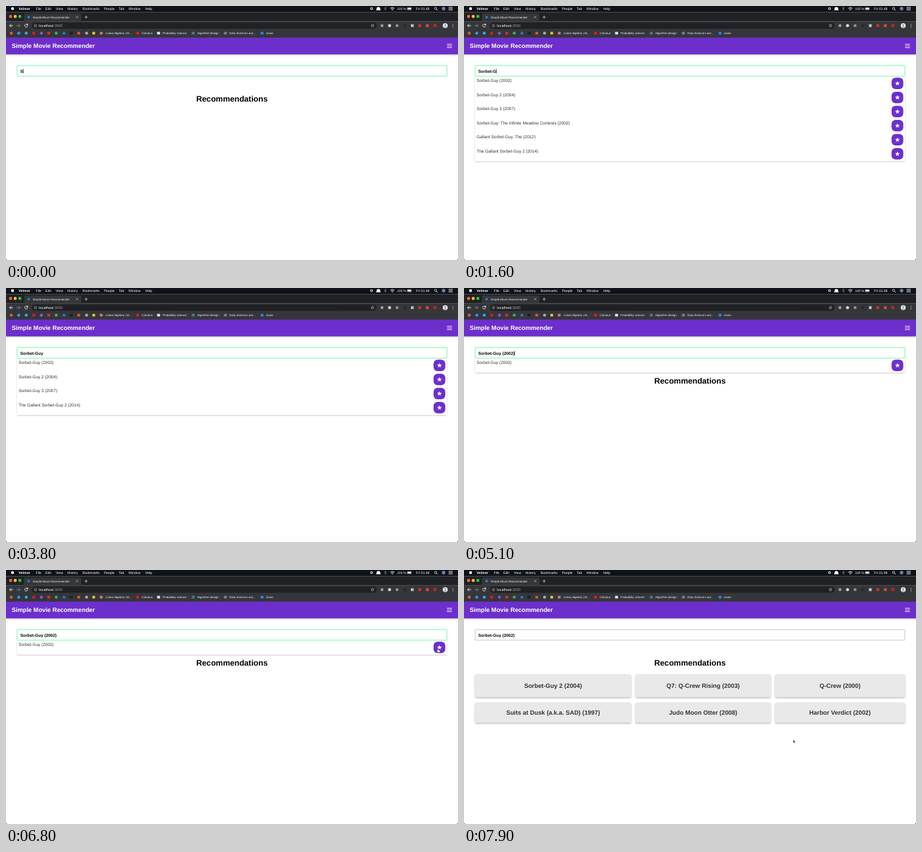
These frames come from a looping animation (690x388 px, 8000 ms). An HTML page:

```html
<!DOCTYPE html>
<html lang="en">
<head>
<meta charset="utf-8">
<title>Simple Movie Recommender</title>
<style>
html, body { margin: 0; width: 100%; height: 100%; overflow: hidden; background: #fff; }
svg { display: block; width: 690px; height: 388px; }
text { font-family: "Liberation Sans", Arial, sans-serif; white-space: pre; text-rendering: geometricPrecision; }
.b { font-weight: 700; }
.mid { text-anchor: middle; }
</style>
</head>
<body>
<svg id="stage" viewBox="0 0 690 388">
  <defs>
    <filter id="soft" x="-10%" y="-30%" width="120%" height="170%"><feGaussianBlur stdDeviation="1.6"/></filter>
    <filter id="thin" x="-5%" y="-30%" width="110%" height="160%"><feGaussianBlur stdDeviation="0.8"/></filter>
  </defs>
  <rect width="690" height="388" fill="#fff"/>
  <g id="page"></g>
  <g id="results"></g>
  <g id="list"></g>
  <g id="field"></g>
  <g id="frame"></g>
  <g id="pointer"></g>
</svg>
<script>
const LOOP = 8000, TICK = 100;
const PURPLE = '#6d2fcc';
const ROW = 21.52, TOP = 108;
const $ = id => document.getElementById(id);

const rect = (x, y, w, h, fill, r = 0, more = '') =>
  `<rect x="${x}" y="${y}" width="${w}" height="${h}" rx="${r}" fill="${fill}" ${more}/>`;
const dot = (x, y, r, fill, more = '') => `<circle cx="${x}" cy="${y}" r="${r}" fill="${fill}" ${more}/>`;
const line = (d, color = '#fff', w = 0.8) =>
  `<path d="${d}" fill="none" stroke="${color}" stroke-width="${w}" stroke-linecap="round" stroke-linejoin="round"/>`;
const label = (x, y, size, str, fill = '#000', cls = '') =>
  `<text x="${x}" y="${y}" font-size="${size}" fill="${fill}" class="${cls}">${str}</text>`;

function starPath(cx, cy, r) {
  const pts = [];
  for (let i = 0; i < 10; i++) {
    const a = i * Math.PI / 5 - Math.PI / 2, k = i % 2 ? r * 0.42 : r;
    pts.push((cx + k * Math.cos(a)).toFixed(2) + ' ' + (cy + k * Math.sin(a)).toFixed(2));
  }
  return 'M' + pts.join('L') + 'Z';
}

// ---- browser window ----
function menuBar() {
  let s = rect(0, 0, 690, 9.3, '#10121a') + dot(10, 4, 2.2, '#fff');
  s += label(19.3, 5.7, 5.3, 'Velmor', '#fff', 'b');
  const items = [[45.5, 'File'], [60, 'Edit'], [76, 'View'], [93.5, 'History'], [117, 'Bookmarks'],
    [149.5, 'People'], [172, 'Tab'], [187, 'Window'], [212.5, 'Help']];
  for (const [x, str] of items) s += label(x, 5.7, 5.2, str, '#fff');
  s += dot(558, 4, 2.1, '#ddd') + dot(558, 4, 0.9, '#111');
  s += '<path d="M565 6.4q.6-.8.7-2.2a2.8 2.8 0 0 1 5.6 0q.1 1.4.7 2.2z" fill="#fff"/>';
  s += line('M577.5 2.7L580.7 5.3L579.1 6.7V1.3L580.7 2.7L577.5 5.3', '#999', 0.5);
  s += line('M586.8 3.2Q589.8.6 592.8 3.2M588 4.6Q589.8 3 591.6 4.6') + dot(589.8, 6, 0.7, '#fff');
  s += label(597, 5.6, 4.9, '100 %', '#fff');
  s += rect(612.6, 2.3, 6.2, 3.6, 'none', 0.7, 'stroke="#fff" stroke-width=".5"') + rect(613.3, 3, 4.8, 2.2, '#fff');
  s += label(626, 5.7, 5.2, 'Fri 01:48', '#fff');
  s += line('M657.2 5L658.8 6.6') + dot(655.8, 3.6, 1.7, 'none', 'stroke="#fff" stroke-width=".7"');
  s += dot(668, 4, 2.7, '#6f7fa8');
  s += line('M676 2H681.5M676 4H681.5M676 6H681.5');
  return s;
}

function tabStrip() {
  let s = rect(0, 9.3, 690, 14.2, '#202124');
  ['#fe5f57', '#febc2e', '#28c840'].forEach((c, i) => s += dot(7 + i * 7.1, 16, 2.4, c));
  s += '<path d="M24.5 23.5Q27.5 23.5 27.5 20.5V14Q27.5 11.5 30 11.5H112.5Q115 11.5 115 14V20.5Q115 23.5 118 23.5Z" fill="#35363a"/>';
  s += dot(34.6, 17, 2, '#2f7fc4') + label(40.7, 18.5, 4.4, 'Simple Movie Recommender', '#f4f5f7');
  s += line('M107.2 15.7L109.8 18.3M109.8 15.7L107.2 18.3', '#ddd', 0.6);
  s += line('M120.2 17H124.4M122.3 14.9V19.1', '#ddd', 0.7);
  return s;
}

function toolBar() {
  let s = rect(0, 23.3, 690, 25, '#35363a');
  s += line('M10.5 30H5.5M7.7 27.8L5.5 30L7.7 32.2', '#fff');
  s += line('M16.5 30H21.5M19.3 27.8L21.5 30L19.3 32.2', '#8c8d90');
  s += line('M32.9 28.7A2.3 2.3 0 1 0 33.1 30.7M33.2 27.2V29H31.4', '#fff');
  s += rect(39.5, 25.2, 526.5, 9.6, '#202124', 4.8);
  s += dot(45, 30, 2, 'none', 'stroke="#bbb" stroke-width=".6"') + line('M45 29.9V31', '#bbb', 0.6);
  s += label(50.3, 31.8, 5.6, 'localhost<tspan fill="#9aa0a6">:3000</tspan>', '#fff');
  s += `<path d="${starPath(559.5, 30, 2.6)}" fill="none" stroke="#ddd" stroke-width=".5"/>`;
  const ext = ['#9b9c9e', '#e8e8e8', '#8f9092', '#2b2c2f', '#b9babc', '#c6342f', '#d8463f', '#cf1f26'];
  ext.forEach((c, i) => s += i < 3 ? dot(574 + i * 11.5, 30, 2.3, c) : rect(572 + i * 11.5, 27.8, 4.4, 4.4, c, 0.6));
  s += dot(670.5, 30, 3.8, '#e9e9ea') + dot(670.5, 29, 1.3, '#8d8f94') + '<path d="M668.3 32.4q2.2-2.6 4.4 0z" fill="#8d8f94"/>';
  [28, 30, 32].forEach(y => s += dot(682.3, y, 0.6, '#eee'));
  return s;
}

function bookmarks() {
  const icons = ['#e2574c', '#2e9be6', '#35a5ee', '#e21b1b', '#8a55d6', '#d7352b', '#3fae5a', '#2d6fd0',
    '#1d1e20', '#e0562c', '#a9aaac', '#e3c52f', '#d9767c'];
  let s = '';
  icons.forEach((c, i) => s += i % 3 == 1 ? dot(8 + i * 11.5, 41.5, 2.3, c) : rect(5.9 + i * 11.45, 39.4, 4.2, 4.2, c, 0.8));
  const links = [[152, 'Linear Algebra | M...'], [207, 'Calculus', '#e21b1b'], [239, 'Probability science', '#dfe6ec'],
    [292, 'Algorithm design', '#4b7892'], [341, 'Data Science Lear...', '#7b7c80'], [397, 'olune', '#2f7fe0']];
  for (const [x, str, c] of links) {
    if (c) s += rect(x - 8.4, 39.4, 4.6, 4.2, c, 0.8);
    s += label(x, 43, 4.4, str, '#f4f5f7');
  }
  return s;
}

function appHeader() {
  return rect(0, 49, 690, 25.6, '#000', 0, 'opacity=".3" filter="url(#soft)"') + rect(0, 48, 690, 25.8, PURPLE) +
    label(8.7, 64.1, 9.33, 'Simple Movie Recommender', '#fff', 'b') +
    line('M673.6 58.4H680.4M673.6 61H680.4M673.6 63.6H680.4', '#fff', 0.9);
}

// ---- content ----
const HERO = 'Sorbet-Guy';
const WIDE = [
  'Sorbets Part 1: The Copper Dune, The (Die Becher, 1. Teil: Der Kupferne Hut) (1919)',
  'Shadows of Sorbet Harbor (Ein Leises Boot im Nebel) (1960)',
  'Beyond Rode a Sorbet (2001)',
  HERO + ' (2002)',
  'Quiet Sorbet Regattas, The (1975)',
  'Sorbetry (2002)',
  'Dizzy Lantern and the Sorbets from Northmoor (1973)',
  'Path of the Sorbet Keeper (1985)',
  'Orchard of the Sorbets (1977)',
  HERO + ' 2 (2004)',
  'Sorbet Farm or, The Oddest Dish Ever Made (Sorbet Farm) (1968)',
  "Sorbet's Timepiece, The (Orologio del campo) (1970)",
  HERO + ' 3 (2007)'
];
const MORE = [HERO + ': The Infinite Meadow Contests (2002)', `Gallant ${HERO}, The (2012)`, `The Gallant ${HERO} 2 (2014)`];
const CARDS = [HERO + ' 2 (2004)', 'Q7: Q-Crew Rising (2003)', 'Q-Crew (2000)',
  'Suits at Dusk (a.k.a. SAD) (1997)', 'Judo Moon Otter (2008)', 'Harbor Verdict (2002)'];

function matches(query) {
  if (query.length < 3) return [];
  if (!query.includes('-')) return WIDE;
  return WIDE.concat(MORE).filter(name => name.includes(query));
}

function listMarkup(rows, hover, ring) {
  if (!rows.length) return '';
  const h = rows.length * ROW;
  let s = rect(17, TOP, 656, h + 0.5, '#000', 0, 'opacity=".25" filter="url(#thin)"') + rect(16.8, TOP - 1, 656.4, h + 0.8, '#fff');
  if (hover) s += rect(17, TOP, 656, h, '#eee');
  rows.forEach((name, i) => {
    const y = TOP + i * ROW;
    s += label(19.3, y + 8.1, 6.46, name, hover ? '#111' : '#333');
    if (ring) s += rect(651.7, y + 0.4, 19.9, 19.6, '#d6e2f5', 7);
    s += rect(652.7, y + 1.4, 17.9, 17.6, PURPLE, 6.2) + `<path d="${starPath(661.65, y + 10.4, 3.9)}" fill="#fff"/>`;
  });
  return s;
}

function cardMarkup() {
  const cols = [[17, 238], [262, 206], [475, 198]], rows = [[159.3, 34.7], [202.5, 30.5]];
  return CARDS.map((name, i) => {
    const [x, w] = cols[i % 3], [y, h] = rows[i / 3 | 0];
    return rect(x, y + 1.4, w, h, '#000', 1.5, 'opacity=".27" filter="url(#soft)"') + rect(x, y, w, h, '#e9e9e9', 1.5) +
      label(x + w / 2, y + h / 2 + 3.1, 9.33, name, '#333', 'b mid');
  }).join('');
}

// ---- timeline ----
const FULL = HERO + ' (2002)';
const KEYS = [-100, 300, 400, 600, 800, 1000, 1200, 1600, 1900, 2000, 3200, 4200, 4300, 4500, 4600, 4800, 5100];
const BLUR = 6900, THINK = 7000, DONE = 7300;
// time, x, y of the pointer's tip
const PATH = [[5400, 396, 94], [5600, 408, 96], [5700, 408, 96], [5900, 507, 123], [6000, 507, 123],
  [6800, 659.3, 120], [7200, 659.3, 120], [7900, 502.6, 259.4]];
const ease = u => u * u * (3 - 2 * u);

function pointerAt(t) {
  if (t < PATH[0][0]) return null;
  let i = 0;
  while (i < PATH.length - 2 && t >= PATH[i + 1][0]) i++;
  const [t0, x0, y0] = PATH[i], [t1, x1, y1] = PATH[i + 1];
  const k = ease(Math.min(1, (t - t0) / (t1 - t0)));
  return { x: x0 + (x1 - x0) * k, y: y0 + (y1 - y0) * k };
}

const SHAPES = {
  beam: line('M-1-3Q0-3 0-2V2Q0 3-1 3M1-3Q0-3 0-2M0 2Q0 3 1 3', '#222', 0.5),
  hand: '<path d="M0 0q.8 0 .8.8v1.5l2 .5q.9.3.7 1.3l-.4 1.800H-.3L-2 3.700q.3-.8 1.300 0V.8Q-.7 0 0 0Z" fill="#fff" stroke="#222" stroke-width=".5"/>',
  arrow: '<path d="M0 0V4.700L1.100 3.700L1.900 5.400L2.700 5L1.900 3.400H3.300Z" fill="#111" stroke="#fff" stroke-width=".35"/>'
};

$('page').innerHTML = label(345, 146.2, 12.18, 'Recommendations', '#000', 'b mid');
$('frame').innerHTML = appHeader() + menuBar() + tabStrip() + toolBar() + bookmarks() +
  '<path d="M0 386V388H2Q0 388 0 386ZM690 386V388H688Q690 388 690 386Z" fill="#000"/>';
$('field').innerHTML =
  rect(16.7, 90.7, 656.6, 16.8, 'none', 1, 'id="glow" stroke="#9dffc4" stroke-width="1.6" opacity=".35"') +
  rect(17.1, 91.1, 655.8, 16, '#fff', 0.5, 'id="box" stroke-width=".8"') +
  '<text id="typed" class="b" x="21.8" y="101.8" font-size="6.43"></text>' +
  rect(0, 96, 0.6, 6.8, '#000', 0, 'id="caret"');

function put(id, html) {
  const el = $(id);
  if (el.shown !== html) el.innerHTML = el.shown = html;
}

function draw(time) {
  const t = Math.floor(time / TICK) * TICK;
  const count = KEYS.filter(k => k <= t).length;
  const query = FULL.slice(0, count);
  const focus = t < BLUR;
  const p = pointerAt(t);

  const typed = $('typed');
  if (typed.textContent !== query) typed.textContent = query;
  $('caret').setAttribute('x', 21.8 + typed.getComputedTextLength());
  const blinkOn = Math.floor((t - KEYS[count - 1]) / 500) % 2 === 0;
  $('caret').style.display = focus && blinkOn ? '' : 'none';
  $('glow').style.display = focus ? '' : 'none';
  $('box').setAttribute('stroke', focus ? '#6ff7a6' : '#b4b4b4');

  const open = t < DONE;
  const inRow = open && p && p.y > TOP && p.y < TOP + ROW;
  const onButton = inRow && p.x > 653;
  put('list', open ? listMarkup(matches(query), inRow && !onButton, !focus) : '');
  put('results', t >= DONE ? cardMarkup() : t >= THINK ? label(345, 177.6, 9.33, 'Thinking...', '#000', 'b mid') : '');

  const shape = !p ? '' : inRow ? SHAPES.hand : open ? SHAPES.beam : SHAPES.arrow;
  put('pointer', shape);
  if (p) $('pointer').setAttribute('transform', `translate(${p.x.toFixed(2)} ${p.y.toFixed(2)})`);
}

const start = performance.now();
function step() {
  draw((performance.now() - start) % LOOP);
  requestAnimationFrame(step);
}
step();
</script>
</body>
</html>
```
